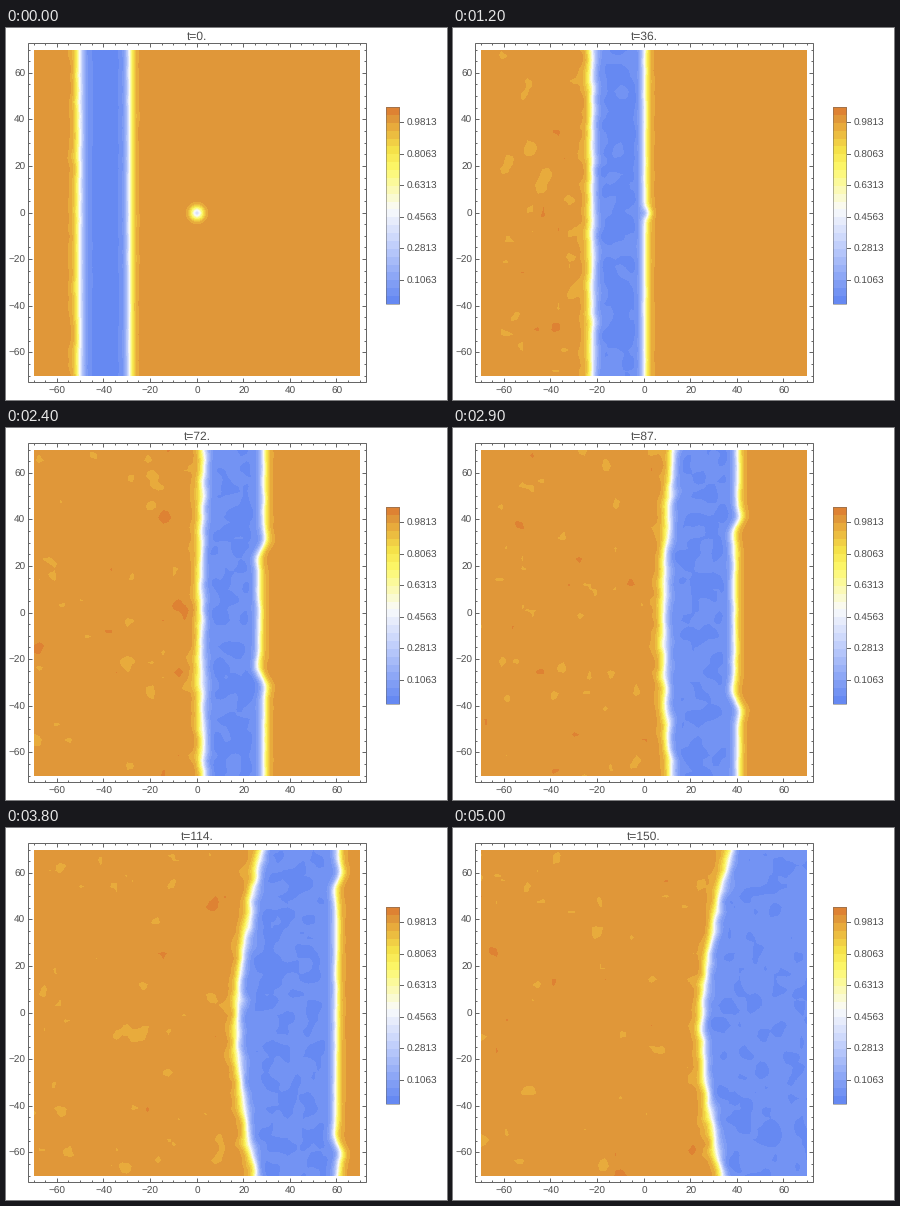
Write a matplotlib script that moves like this. It is 441x372 px and loops after 5.1 s.

```python
import numpy as np
import matplotlib.pyplot as plt
from matplotlib.animation import FuncAnimation
from matplotlib.collections import LineCollection
from matplotlib.colors import BoundaryNorm, LinearSegmentedColormap
from matplotlib.patches import Rectangle

W, H, DPI = 441, 372, 100
FRAMES, STEP_MS, DT = 51, 100, 3
LEFT, RIGHT, TOP, BOTTOM = 28, 354, 22, 348
SIZE = RIGHT - LEFT
SCALE = SIZE / 140
GREY = "#666666"
TEXT = "#4c4c4c"

plt.rcParams["font.family"] = "Liberation Sans"
plt.rcParams["text.hinting"] = "none"

# Colour bands: blue, white, yellow, orange
BANDS = 25
LEVELS = -0.025 + 0.04375 * np.arange(BANDS + 1)
STOPS = [(0, "#6689f2"), (0.28, "#becdfb"), (0.48, "#fafbfc"), (0.70, "#fdf868"),
         (0.79, "#f6e24a"), (0.917, "#e8ab3c"), (0.958, "#e1983a"), (1, "#de8233")]
cmap = LinearSegmentedColormap.from_list("bands", STOPS, N=BANDS)
norm = BoundaryNorm(LEVELS, BANDS)

# Pixel centres in plot units
axis = (np.arange(SIZE) + 0.5) / SCALE - 70
X, Y = axis[None, :], -axis[:, None]


def sigmoid(v):
    return 1 / (1 + np.exp(-np.clip(v, -40, 40)))


def bump(v):
    return np.exp(-v * v)


def smoothstep(v):
    v = np.clip(v, 0, 1)
    return v * v * (3 - 2 * v)


def make_noise():
    """Blotchy unit-variance fields on a coarse mesh, drifting over time."""
    rng = np.random.default_rng(12)
    n = 64
    raw = rng.normal(size=(FRAMES + 4, n + 2, n + 2))
    rows = raw[:, :-2] + 2 * raw[:, 1:-1] + raw[:, 2:]
    soft = rows[:, :, :-2] + 2 * rows[:, :, 1:-1] + rows[:, :, 2:]
    drift = sum(w * soft[k:k + FRAMES] for k, w in enumerate((1, 2, 3, 2, 1)))
    return drift / drift.std()


NOISE = make_noise()
NODES = np.linspace(-70, 70, NOISE.shape[1])
SPREAD = np.maximum(0, 1 - np.abs(axis[:, None] - NODES) / (NODES[1] - NODES[0]))


def lead_edge(t):
    """Nearly steady front; the dent left by the spot widens along it."""
    front = -29 + 0.826 * t - 0.00036 * t * t
    d = np.abs(Y) - max(0.7 * (t - 28), 0)
    depth = 0.8 + 1.2 * bump((t - 66) / 25)
    ripple = 1.6 * bump(d / 4) - 0.8 * bump((d + 8) / 4)
    return front + smoothstep((t - 33) / 15) * (ripple - depth * sigmoid(-d / 2))


def trail_edge(t):
    """Slows down after the middle of the run and bends into a bow."""
    back = -50.3 + 0.78 * t - 0.038 * max(t - 50, 0) ** 1.52
    bow = 10.5 * smoothstep((t - 55) / 75)
    return back + bow * np.abs((Y + 7) / 70) ** 1.7


def field(i):
    t = DT * i
    noise = SPREAD @ NOISE[i] @ SPREAD.T
    lead, trail = lead_edge(t), trail_edge(t)
    wobble = 0.25 * min(0.3 + t / 100, 1.2) * noise
    inside = sigmoid((X - trail - wobble) / 1.2) * sigmoid((lead - X + 0.7 * wobble) / 1.05)
    u = 1 - inside * (0.992 - 0.0001 * t)
    if t < 45:
        u = u * (1 - 0.6 * bump(np.hypot(X, Y) / 2.6))

    touched = sigmoid(lead + 4 - X) * sigmoid((X + 57 + 0.25 * t) / 2)
    near = np.maximum(bump((X - trail + 3) / 3), bump((X - lead - 3) / 2))
    gain = np.maximum(min(t / 9, 1), near)
    strength = 0.0118 - 0.000012 * t
    return np.clip(u + strength * gain * touched * noise,
                   LEVELS[0] + 1e-6, LEVELS[-1] - 1e-6)


def mid(v):
    """Centre of the pixel that holds v, for crisp lines."""
    return np.floor(v) + 0.5


def box(x0, y0, x1, y1, alpha=1):
    ax.add_patch(Rectangle((x0, y0), x1 - x0, y1 - y0, fill=False,
                           ec=GREY, lw=0.72, alpha=alpha, snap=False))


def add_lines(segments):
    ax.add_collection(LineCollection(segments, colors=GREY, linewidths=0.72, snap=False))


def label(x, y, s, ha="center", px=10):
    return ax.text(x, y, s, ha=ha, va="baseline", color=TEXT, fontsize=px * 72 / DPI)


def draw_frame():
    x0, y0, x1, y1 = 22.5, 15.5, 360.5, 354.5
    ticks = []
    for v in range(-70, 71, 5):
        major = v % 20 == 0
        n = 4 if major else 2
        px = LEFT + (v + 70) * SCALE
        py = BOTTOM - (v + 70) * SCALE
        if major:
            s = str(v).replace("-", "\u2212")
            label(px, 366.3, s)
            label(19.3, py + 3.5, s, "right")
        px, py = mid(px), mid(py)
        ticks += [[(px, y1), (px, y1 - n)], [(px, y0), (px, y0 + n)],
                  [(x0, py), (x0 + n, py)], [(x1, py), (x1 - n, py)]]
    box(x0, y0, x1, y1)
    add_lines(ticks)


def draw_legend():
    x0, x1, y0, y1 = 380, 394, 79, 276
    ax.imshow(np.arange(BANDS)[::-1, None], cmap=cmap, vmin=0, vmax=BANDS - 1,
              extent=(x0, x1, y1, y0), aspect="auto", interpolation="nearest")
    box(x0 + 0.5, y0 + 0.5, x1 - 0.5, y1 + 0.5, alpha=0.5)
    ticks = []
    for k in range(3, BANDS, 4):
        y = y1 - k * (y1 - y0) / BANDS
        ticks.append([(x1, mid(y)), (x1 + 4, mid(y))])
        label(400.3, y + 3.5, f"{LEVELS[k] + 1e-9:.4f}", "left")
    add_lines(ticks)


fig = plt.figure(figsize=(W / DPI, H / DPI), dpi=DPI, facecolor="white")
ax = fig.add_axes([0, 0, 1, 1])
ax.axis("off")
image = ax.imshow(field(0), cmap=cmap, norm=norm, extent=(LEFT, RIGHT, BOTTOM, TOP),
                  aspect="auto", interpolation="nearest")
draw_frame()
draw_legend()
title = label(191, 12, "t=0.", px=12)
ax.set(xlim=(0, W), ylim=(H, 0))


def update(i):
    image.set_data(field(i))
    title.set_text(f"t={DT * i}.")
    return image, title


anim = FuncAnimation(fig, update, frames=FRAMES, interval=STEP_MS,
                     repeat=True, repeat_delay=0, init_func=lambda: update(0))
plt.show()
```
